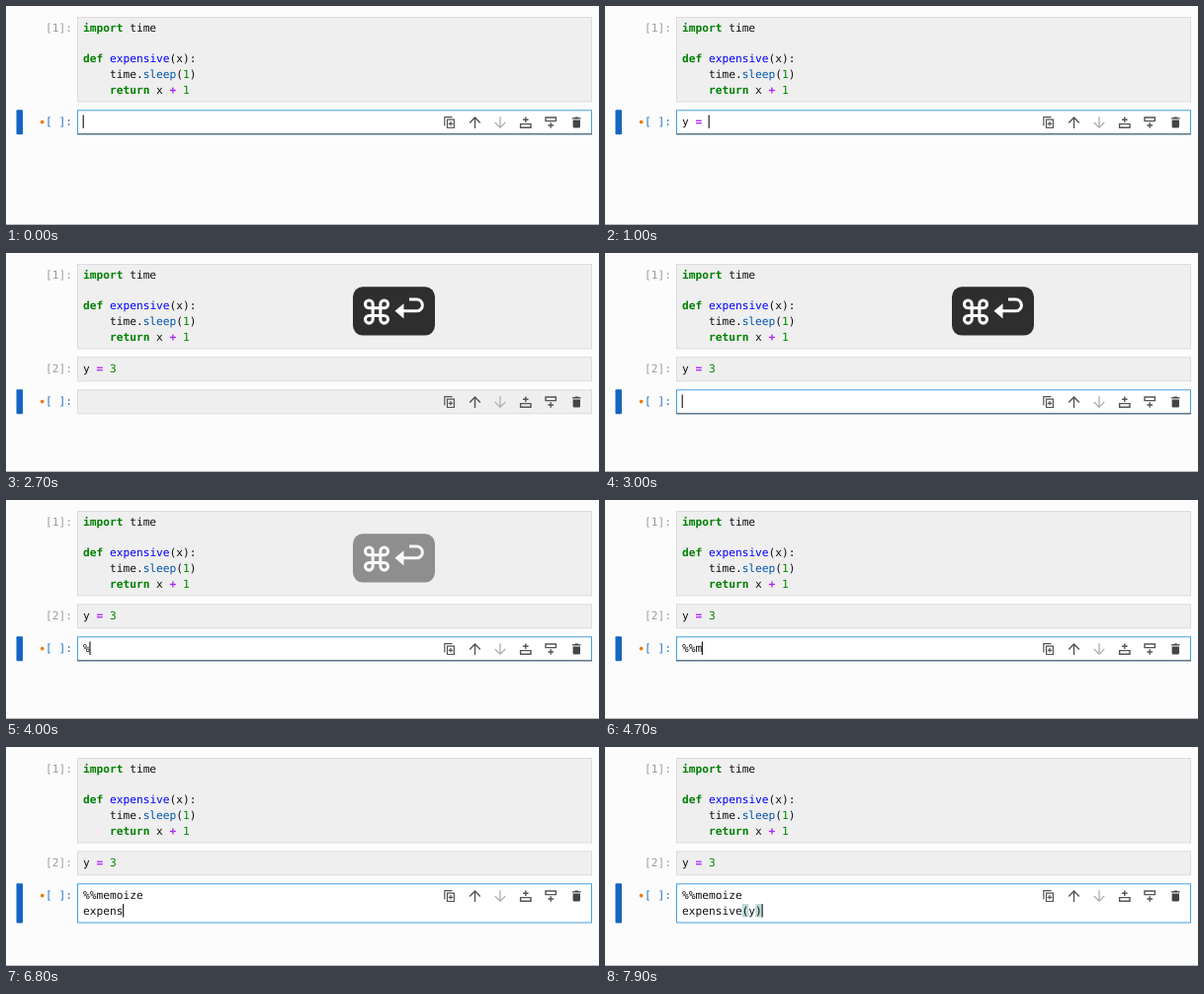
Write an HTML page that moves like this. It is 600 by 222 pixels and loops after 8 s.

```html
<!DOCTYPE html>
<html lang="en">
<head>
<meta charset="utf-8">
<title>Notebook typing</title>
<style>
html, body { margin: 0; width: 600px; height: 222px; overflow: hidden; background: #fcfcfc; }
svg { display: block; }
text { font: 11.2px "DejaVu Sans Mono", monospace; white-space: pre; fill: #111; text-rendering: geometricPrecision; }
.kw { fill: #008000; font-weight: bold; }
.fn { fill: #0000ff; }
.prop { fill: #0055aa; }
.op { fill: #aa22ff; font-weight: bold; }
.num { fill: #008800; }
.prompt { fill: #9c9c9c; text-anchor: end; }
.prompt.on { fill: #1f6fc0; }
.box { fill: #efefef; stroke: #dcdcdc; }
.box.focus { fill: #fff; stroke: #45a0e2; }
.icon { fill: none; stroke: #555; stroke-width: 1.4; }
</style>
</head>
<body>
<svg width="600" height="222" viewBox="0 0 600 222">
  <rect y="221" width="600" height="1" fill="#bdbdbd"/>
  <rect id="bar" x="10.5" width="6.5" rx="1" fill="#1565c0"/>

  <rect class="box" x="72.5" y="11.5" width="520" height="85.5"/>
  <text class="prompt" x="67" y="26.2">[1]:</text>
  <text x="78" y="26.2"><tspan class="kw">import</tspan> time</text>
  <text x="78" y="57.4"><tspan class="kw">def</tspan> <tspan class="fn">expensive</tspan>(x):</text>
  <text x="78" y="73">    time.<tspan class="prop">sleep</tspan>(<tspan class="num">1</tspan>)</text>
  <text x="78" y="88.6">    <tspan class="kw">return</tspan> x <tspan class="op">+</tspan> <tspan class="num">1</tspan></text>

  <rect id="box2" class="box" x="72.5" y="105.8" width="520" height="24"/>
  <text id="prompt2" class="prompt" x="67" y="121.2"></text>
  <text id="code2" x="78" y="121.2"></text>

  <g id="cell3">
    <rect id="box3" class="box" x="72.5" y="138.8" width="520"/>
    <text class="prompt on" x="67" y="154">[ ]:</text>
    <rect id="open" x="138.7" y="159" width="6.7" height="13.5"/>
    <rect id="close" x="152.2" y="159" width="6.7" height="13.5" fill="#328c82" fill-opacity=".32"/>
    <text id="line1" x="78" y="154"></text>
    <text id="line2" x="78" y="169.6"></text>
  </g>
  <rect id="edge" x="72" width="521" height="1.2" fill="#61696f"/>
  <circle id="dot" cx="36.7" r="1.9" fill="#f07c10"/>
  <rect id="caret" width="1.2" height="13.5" fill="#222"/>

  <g id="tools" class="icon">
    <path d="M443.8 121.5V112.7H451.5M446.5 115.2H453.4V123.5H446.5ZM449.95 117.1V121.6M447.7 119.35H452.2" stroke-width="1.2"/>
    <path d="M474.5 124V113.2M469.2 118.4L474.5 113L479.8 118.4"/>
    <path d="M500 112.3V123.1M494.7 117.9L500 123.3L505.3 117.9" stroke="#b4b4b4"/>
    <path d="M520.6 119.6H531V123.2H520.6ZM525.8 112.4V118M523 115.2H528.6"/>
    <path d="M546 113H556.4V116.6H546ZM551.2 118.2V123.8M548.4 121H554"/>
    <path d="M573 113.2H575.2L576 112.4H578.6L579.4 113.2H581.6V114.6H573ZM573.6 115.4H581V122.2Q581 123.6 579.6 123.6H575Q573.6 123.6 573.6 122.2Z" fill="#444" stroke="none"/>
  </g>

  <g id="keys">
    <rect x="351" y="34.3" width="83" height="49.3" rx="10" fill="#2e2e2e"/>
    <path transform="translate(375 59.6) scale(1.28) translate(-12 -12)" fill="none" stroke="#fff" stroke-width="2.4"
      d="M18 3a3 3 0 0 0-3 3v12a3 3 0 1 0 3-3H6a3 3 0 1 0 3 3V6a3 3 0 1 0-3 3h12a3 3 0 1 0 0-6"/>
    <path d="M408 47H415.5a5.9 5.9 0 0 1 0 11.8H400" fill="none" stroke="#fff" stroke-width="3"/>
    <path d="M393.5 58.8L402.5 51.2V66.4Z" fill="#fff"/>
  </g>
</svg>
<script>
const LOOP = 8000, CHAR = 6.743, BLINK = 1200;
const RUN = 2000, INSERT = 2500, EDIT = 2800, FADE = 3700, FADE_END = 4300;
const $ = id => document.getElementById(id);
const set = (id, attrs) => { for (const k in attrs) $(id).setAttribute(k, attrs[k]); };
const show = (id, on) => set(id, { visibility: on ? "visible" : "hidden" });

// Typed text with the time of each key press
const first = { text: "y = 3", at: [300, 500, 700, 900, 1100] };
const second = {
  text: "%%memoize\nexpensive(y)",
  at: [3800, 4100, 4700, 4900, 5000, 5100, 5200, 5300, 5400, 5600,
    6000, 6200, 6300, 6500, 6600, 6800, 6900, 7000, 7200, 7400, 7700, 7900]
};

function typed({ text, at }, t, start) {
  const n = at.filter(k => k <= t).length;
  return { text: text.slice(0, n), last: n ? at[n - 1] : start };
}

const paint = s => s
  .replace("=", '<tspan class="op">=</tspan>')
  .replace("3", '<tspan class="num">3</tspan>');

function render(t) {
  const a = typed(first, t, 0), b = typed(second, t, EDIT);
  const inThird = t >= INSERT;
  const editing = t < RUN || t >= EDIT;
  const [line1, line2] = b.text.split("\n");
  const tall = line2 !== undefined;
  const top = inThird ? 138.8 : 105.8;
  const height = tall ? 39.2 : 24;

  $("code2").innerHTML = paint(a.text);
  $("prompt2").textContent = t < RUN ? "[ ]:" : "[2]:";
  $("prompt2").classList.toggle("on", !inThird);
  $("box2").classList.toggle("focus", t < RUN);

  $("cell3").style.display = inThird ? "" : "none";
  $("box3").classList.toggle("focus", editing);
  set("box3", { height });
  $("line1").textContent = line1;
  $("line2").textContent = line2 || "";

  set("bar", { y: top - .5, height: height + 1 });
  set("dot", { cy: top + 11.8 });
  set("tools", { transform: `translate(0 ${inThird ? 33 : 0})` });
  set("edge", { y: top + 23.4 });
  show("edge", editing && !tall);

  const current = inThird ? b : a;
  const row = inThird ? (tall ? line2 : line1) : a.text;
  set("caret", { x: 77.6 + row.length * CHAR, y: top + 4.7 + (tall ? 15.6 : 0) });
  show("caret", editing && (t - current.last) % BLINK < BLINK / 2);

  const matched = tall && line2.endsWith(")");
  const unmatched = tall && line2.endsWith("(");
  set("open", {
    fill: matched ? "#328c82" : "#bb5555",
    "fill-opacity": matched ? .32 : unmatched ? .27 : 0
  });
  set("close", { "fill-opacity": matched ? .32 : 0 });

  const fade = (FADE_END - t) / (FADE_END - FADE);
  set("keys", { opacity: t < RUN ? 0 : Math.max(0, Math.min(1, fade)) });
}

function tick() {
  render(performance.now() % LOOP);
  requestAnimationFrame(tick);
}
tick();
</script>
</body>
</html>
```
